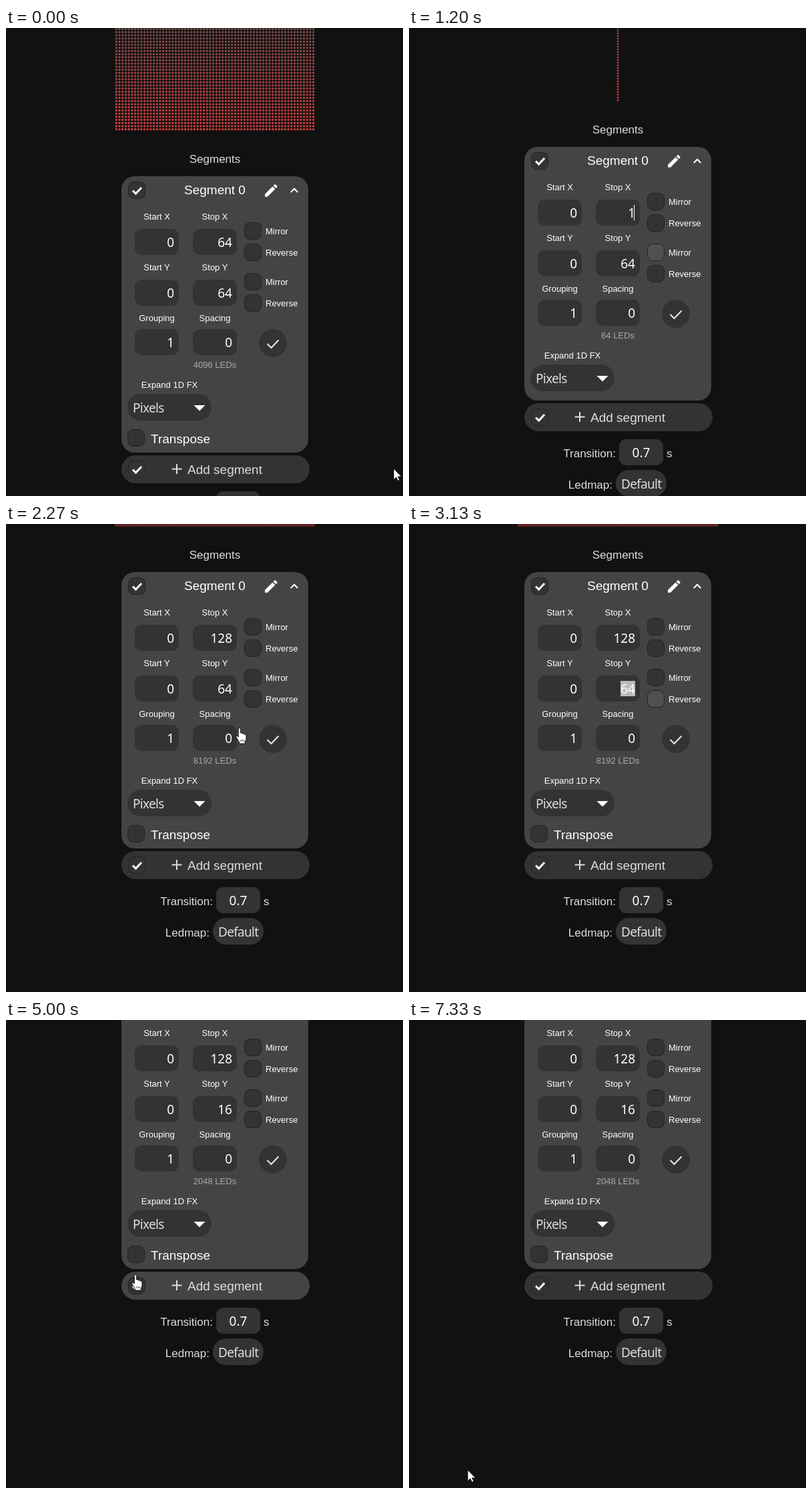
Write an HTML page that moves like this. It is 595x701 px and loops after 7.4 s.

```html
<!DOCTYPE html>
<html lang="en">
<head>
<meta charset="utf-8">
<title>Segment editor</title>
<style>
  html, body { margin: 0; width: 100%; height: 100%; overflow: hidden; background: #111; }
  svg { display: block; width: 595px; height: 701px; }
  text { font: 13px "Liberation Sans", Arial, sans-serif; fill: #fff; white-space: pre; }
  .big { font-size: 19px; }
  .mid { font-size: 17px; fill: #ddd; }
  .soft { fill: #ddd; }
  .dim { fill: #aaa; }
  .num { font: 19px "Noto Sans", "Open Sans", sans-serif; }
  .word { font: 19px "Noto Sans", "Open Sans", sans-serif; letter-spacing: -.7px; fill: #ddd; }
</style>
</head>
<body>
<svg id="stage" viewBox="0 0 595 701"></svg>
<script>
const LOOP = 7400;
const GRID_TOP = -146;
const CENTER = 313;
const BOX_X = 357;
const STOP_X = 280;

// start time, columns, rows, dot pitch
const LAYOUTS = [
  [0, 64, 64, 300 / 64],
  [870, 1, 64, 4],
  [1330, 12, 64, 298 / 64],
  [2070, 128, 64, 300 / 128],
  [3200, 128, 1, 300 / 128],
  [3670, 128, 16, 300 / 128]
];

// time, x, y of the pointer
const PATH = [
  [0, 581, 660], [530, 307, 322], [800, 368, 326], [2200, 368, 326],
  [2470, 300, 247], [2730, 368, 252], [3670, 368, 252], [4270, 194, 382],
  [5270, 194, 382], [5600, 400, 205], [5800, 400, 205], [6130, 401, 303],
  [6600, 74, 697], [6670, 74, 703], [7200, 45, 703], [7270, 65, 692],
  [7330, 88, 674], [7400, 88, 674]
];

const POINTERS = {
  arrow: '<path d="M0 0V16.5L3.9 12.9L6.4 18.3L9 17.1L6.6 11.9H11.6Z" fill="#fff" stroke="#000" stroke-width=".8"/>',
  hand: '<path d="M-1.7 1.3Q-1.7-.5 0-.5Q1.7-.5 1.7 1.3V7Q4 6.3 4.5 8Q7 7.3 7.3 9Q10 8.6 10 11V15Q10 18 8.3 20V23H-.5V20.5L-5 13.5Q-5.8 11-3.5 11.3L-1.7 13Z" fill="#fff" stroke="#000" stroke-width=".9"/>' +
    '<path d="M2 17v3M4.3 17v3M6.6 17v3" stroke="#000" stroke-width=".7"/>',
  beam: '<path d="M-3-9H-1L0-8L1-9H3M0-8V8M-3 9H-1L0 8L1 9H3" fill="none" stroke="#ddd"/>'
};

const during = (t, ...spans) => spans.some(([a, b]) => t >= a && t < b);
const inside = (m, x, y, w, h) => m.x >= x && m.x < x + w && m.y >= y && m.y < y + h;

const rect = (x, y, w, h, r, fill, more = '') =>
  `<rect x="${x}" y="${y}" width="${w}" height="${h}" rx="${r}" fill="${fill}" ${more}/>`;
const text = (x, y, str, cls = '', anchor = 'start') =>
  `<text x="${x}" y="${y}" class="${cls}" text-anchor="${anchor}">${str}</text>`;
const line = (d, width, color = '#fff') =>
  `<path d="${d}" fill="none" stroke="${color}" stroke-width="${width}"/>`;

function pointerAt(t) {
  const i = Math.max(1, PATH.findIndex(p => p[0] >= t));
  const [t0, x0, y0] = PATH[i - 1], [t1, x1, y1] = PATH[i];
  const f = (t - t0) / (t1 - t0);
  return { x: Math.round(x0 + (x1 - x0) * f), y: Math.round(y0 + (y1 - y0) * f) };
}

function dots(cols, rows, pitch) {
  const x = CENTER - (cols - 1) * pitch / 2;
  let out = '';
  for (let r = 0; r < rows; r++) {
    const y = GRID_TOP + (r + .5) * pitch;
    if (y < -3) continue;
    const f = (r + .5) / rows;
    const red = Math.round(28 + 180 * f), rest = Math.round(90 - 32 * f);
    out += `<path d="M${x} ${y}h${(cols - 1) * pitch + .05}" stroke="rgb(${red},${rest},${rest})"/>`;
  }
  return `<g stroke-width="${pitch * .75}" stroke-linecap="round" stroke-dasharray="0 ${pitch}">${out}</g>`;
}

function checkbox(x, cy, hover, checked) {
  return rect(x + .5, cy - 12.5, 25, 25, 8, hover ? '#505050' : '#333', 'stroke="#222"') +
    (checked ? line(`M${x + 7} ${cy + .5}l4.5 4.5l8.5-9`, 3) : '');
}

function field(x, y, value, opt = {}) {
  return rect(x, y, 66, 39, 10, '#333') +
    (opt.selected ? rect(x + 37, y + 8, 22, 23, 0, '#bbb') : '') +
    text(x + 59, y + 27, value, 'num', 'end') +
    (opt.caret ? rect(x + 57, y + 8, 1, 23, 0, '#fff') : '');
}

function panel(t, cols, rows, height, m) {
  const over = (x, y, w, h) => inside(m, x, y, w, h);
  const label = (x, y, str) => text(x, y, str, '', 'middle');
  const option = (cy, str) =>
    checkbox(BOX_X, cy, over(BOX_X, cy - 13, 26, 26)) + text(389, cy + 5, str);
  const add = height + 4;
  const addHover = over(173, add, 282, 42) && !over(183, add + 8, 27, 27);
  const wide = height > 400;

  return text(CENTER, -20, 'Segments', 'mid', 'middle') +
    rect(173, 0, 280, height, 20, '#444') +
    checkbox(183, 21, false, true) +
    text(CENTER, 27, 'Segment 0', 'big', 'middle') +
    '<path transform="translate(385 9) scale(1.03)" fill="#fff" d="M3 17.25V21h3.75L17.81 9.94l-3.75-3.75zM20.71 7.04a1 1 0 0 0 0-1.41l-2.34-2.34a1 1 0 0 0-1.41 0l-1.83 1.83 3.75 3.75z"/>' +
    line('M426.8 24L432 18.8L437.2 24', 2.2) +

    label(226, 65, 'Start X') + label(CENTER, 65, 'Stop X') +
    field(193, 79, 0) +
    field(STOP_X, 79, cols, {
      selected: during(t, [600, 870]),
      caret: during(t, [870, 1870])
    }) +
    label(226, 141, 'Start Y') + label(CENTER, 141, 'Stop Y') +
    field(193, 155, 0) +
    field(STOP_X, 155, rows, {
      selected: during(t, [2600, 3200]),
      caret: during(t, [3200, 4200], [4730, 5000])
    }) +
    label(226, 217, 'Grouping') + label(CENTER, 217, 'Spacing') +
    field(193, 229, 1) + field(STOP_X, 229, 0) +
    option(82, 'Mirror') + option(114, 'Reverse') +
    option(158, 'Mirror') + option(190, 'Reverse') +

    `<circle cx="400" cy="250" r="21" fill="${over(379, 229, 42, 42) ? '#555' : '#333'}"/>` +
    line('M391.5 251L397.5 257L408.5 245.5', 2, '#e8e8e8') +
    text(CENTER, 287, `${cols * rows} LEDs`, 'dim', 'middle') +

    label(245, 317, 'Expand 1D FX') +
    rect(182, 326, 126, 40, 20, '#333') +
    text(190, 354, 'Pixels', 'word') +
    '<path d="M281.5 343H298.5L290 351.5Z" fill="#fff"/>' +
    (wide ? checkbox(182, 392, over(182, 379, 26, 26)) + text(217, 400, 'Transpose', 'big') : '') +

    rect(173, add, 282, 42, 21, addHover ? '#444' : '#333') +
    checkbox(183, add + 21, false, true) +
    line(`M248.5 ${add + 20.5}h15M256 ${add + 13}v15`, 2, '#ddd') +
    text(272, add + 28, 'Add segment', 'big soft') +

    text(310, height + 85, 'Transition:', 'mid', 'end') +
    rect(315, height + 58, 66, 39, 10, '#333') +
    text(348, height + 85, '0.7', 'num', 'middle') +
    text(386, height + 85, 's', 'mid') +
    text(305, height + 132, 'Ledmap:', 'mid', 'end') +
    rect(310, height + 104, 76, 40, 20, '#333') +
    text(318, height + 132, 'Default', 'word');
}

function pointerKind(m, height) {
  if (inside(m, STOP_X, 79, 66, 39) || inside(m, STOP_X, 155, 66, 39)) return 'beam';
  return inside(m, 173, 0, 282, height + 46) ? 'hand' : 'arrow';
}

const stage = document.getElementById('stage');

function draw(t) {
  const [, cols, rows, pitch] = LAYOUTS.filter(l => l[0] <= t).pop();
  const top = Math.floor(GRID_TOP + rows * pitch + 68 + 1e-6);
  const height = cols > 1 && rows > 1 ? 414 : 380;
  const mouse = pointerAt(t);
  const local = { x: mouse.x, y: mouse.y - top };
  const typing = during(t, [870, 2270], [2870, 3730]);
  const scrollbar = during(t, [130, 870], [1400, 2070]);

  stage.innerHTML = dots(cols, rows, pitch) +
    `<g transform="translate(0 ${top})">${panel(t, cols, rows, height, local)}</g>` +
    (scrollbar ? rect(548, 0, 2, 629.5, 0, '#444') : '') +
    (typing ? '' : `<g transform="translate(${mouse.x} ${mouse.y})">${POINTERS[pointerKind(local, height)]}</g>`);
}

// The screen refreshes 15 times a second.
let last = -1;
function tick() {
  const step = Math.floor((performance.now() % LOOP + 5) * 15 / 1000) % 111;
  if (step !== last) {
    last = step;
    draw(Math.round(step * 20 / 3) * 10);
  }
  requestAnimationFrame(tick);
}
tick();
</script>
</body>
</html>
```
